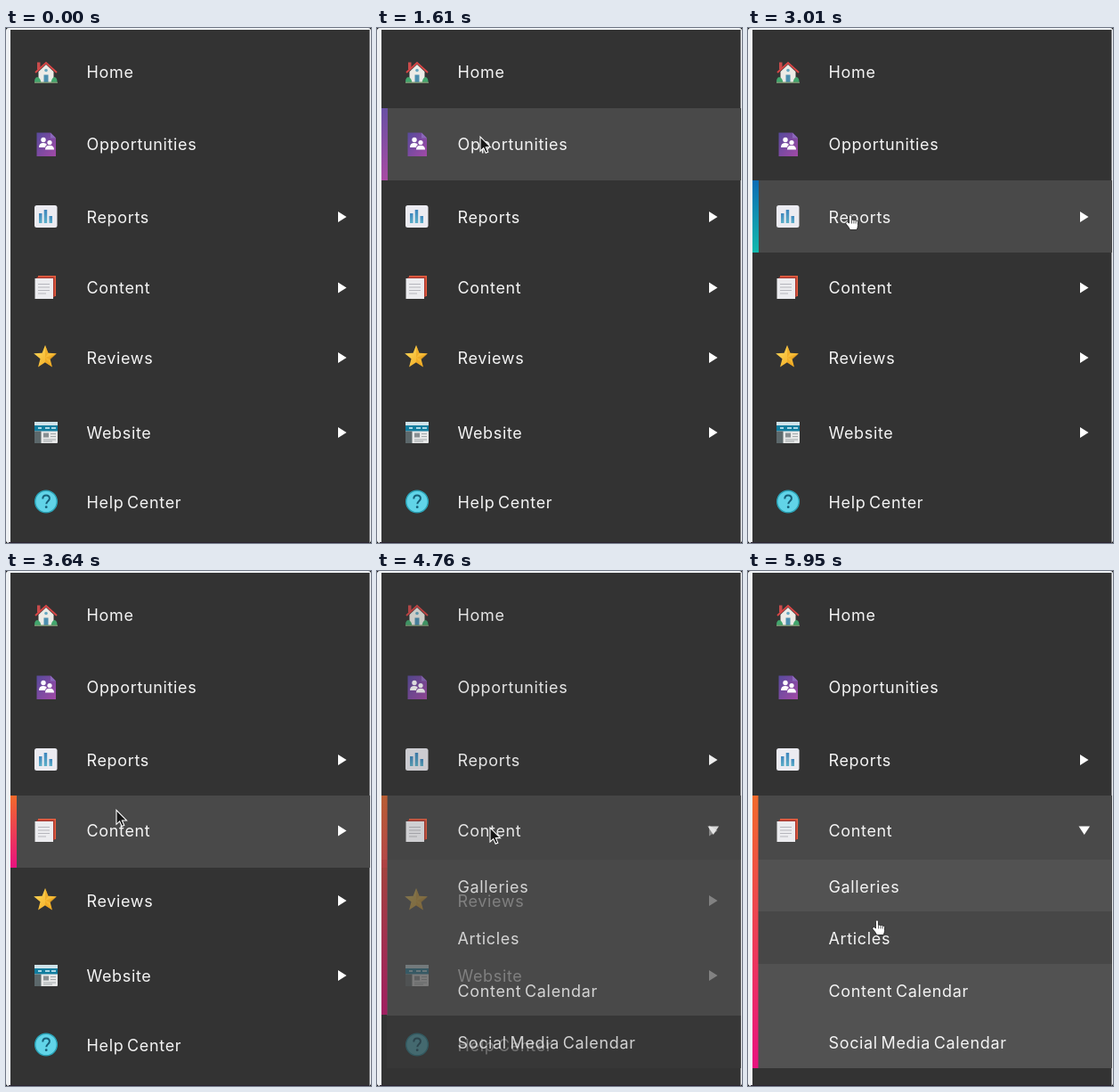
An HTML page that plays this animation: 410x578 px, repeating every 6.3 s.

```html
<!DOCTYPE html>
<html lang="en">
<head>
<meta charset="utf-8">
<title>Sidebar menu</title>
<style>
  html, body { margin: 0; width: 100%; height: 100%; overflow: hidden; background: #000; }
  svg { display: block; width: 410px; height: 578px; }
  text { font: 400 18px Inter, "Open Sans", sans-serif; letter-spacing: .65px; word-spacing: -2px; fill: #f4f4f4; }
  #hovers, #submenu { shape-rendering: crispEdges; }
</style>
</head>
<body>
<svg viewBox="0 0 410 578">
  <defs>
    <linearGradient id="purple" x2="0" y2="1"><stop stop-color="#6950a4"/><stop offset="1" stop-color="#a84ba3"/></linearGradient>
    <linearGradient id="teal" x2="0" y2="1"><stop stop-color="#0c6cb5"/><stop offset="1" stop-color="#12b9ad"/></linearGradient>
    <linearGradient id="sunset" x2="0" y2="1"><stop stop-color="#f26a2b"/><stop offset="1" stop-color="#e8127f"/></linearGradient>
    <linearGradient id="page" x2="1" y2="1"><stop stop-color="#574a9c"/><stop offset="1" stop-color="#a24aa6"/></linearGradient>
    <linearGradient id="column" x2="0" y2="1"><stop stop-color="#3f86bd"/><stop offset="1" stop-color="#5db0c9"/></linearGradient>
    <linearGradient id="gold" x2="1" y2="1"><stop stop-color="#ffdc5e"/><stop offset="1" stop-color="#f0a51c"/></linearGradient>
  </defs>

  <rect width="410" height="578" rx="3" fill="#eef1f4"/>
  <path d="M5 2H408.5V578H5z" fill="#333"/>
  <path d="M3 577H408v1H3z" fill="#2a2230"/>

  <g id="hovers"></g>
  <g id="submenu"></g>
  <g id="items"></g>
  <rect id="openBar" x="5" y="252" width="6.5" fill="url(#sunset)"/>

  <g id="icons">
    <g>
      <path d="M35 38.500h3.500v8H35z" fill="#c94b4b"/>
      <path d="M36.500 49 45 41 53.500 49V61h-17z" fill="#ecebe6"/>
      <path d="M33 50 45 39 57 50" fill="none" stroke="#d94747" stroke-width="1.900"/>
      <path d="M42.500 52.500h5v9h-5z" fill="#4b8fae"/>
      <circle cx="45" cy="47.500" r="1.800" fill="#67a8c2"/>
      <path d="M32 62q-.5-6 3-7 4 1 4.500 7zM50.500 62q.5-6 4-7 3.500 1 3 7z" fill="#42a66d"/>
      <path d="M32 60.500h26V62H32z" fill="#79906f"/>
    </g>
    <g>
      <path d="M34.500 117.500H50l6 6V144H34.500z" fill="url(#page)"/>
      <path d="M50 117.500v6h6z" fill="#8b68bb"/>
      <g fill="#fff">
        <circle cx="42" cy="125.500" r="2.700"/><path d="M37 134q0-5 5-5 3 0 4 2-2 1-2 3z"/>
        <circle cx="49" cy="128.500" r="2.600"/><path d="M44 136.500q0-4.800 5-4.800t5 4.800z"/>
      </g>
    </g>
    <g>
      <rect x="32" y="199" width="25.500" height="25" rx="2.500" fill="#ebebf1"/>
      <g fill="url(#column)">
        <rect x="37" y="208" width="3.500" height="11"/>
        <rect x="42.700" y="204" width="3.500" height="15"/>
        <rect x="48.500" y="211" width="3.500" height="8"/>
      </g>
    </g>
    <g>
      <path d="M36 278h20v23H36z" fill="#e85f3f"/>
      <path d="M34.500 279.500h20V302h-20z" fill="#a83932"/>
      <path d="M32.500 281h20.500v23H32.500z" fill="#ececef"/>
      <path d="M36 287.500h13M36 291h13M36 294.500h13M36 298h9" stroke="#b6b6bc" stroke-width="1.200"/>
    </g>
    <g class="covered">
      <path id="star" fill="url(#gold)"/>
      <path d="M44 370 44 356 47.500 364.700zM44 370 57 365.500 50 372zM44 370 52 380.500 44 375.500z" fill="#e9a01c" opacity=".55"/>
    </g>
    <g class="covered">
      <rect x="32" y="442" width="26" height="24" rx="1" fill="#e7e8e8"/>
      <path d="M32 442h26v4H32z" fill="#cfe3ea"/>
      <path d="M32 446h26v6.500H32z" fill="#117d9f"/>
      <path d="M36 449h4M44 449h5M51 449h5" stroke="#d9f4fb" stroke-width="1.500"/>
      <path d="M32 452.500h7.500V466H32z" fill="#5c686b"/>
      <path d="M42 454.500h6v5h-6z" fill="#888f92"/>
      <path d="M50 455.500h6M50 458.500h6M42 462h14M42 464h10" stroke="#a2a8aa"/>
    </g>
    <g class="covered">
      <circle cx="45" cy="531.500" r="12.300" fill="#61d4e8" stroke="#2ba3b7" stroke-width="1.500"/>
      <path d="M41.300 528.500q0-4 3.800-4t3.800 3.500c0 3-3.600 3-3.600 6.300" fill="none" stroke="#176079" stroke-width="2"/>
      <circle cx="45.200" cy="537.700" r="1.400" fill="#176079"/>
    </g>
  </g>

  <path id="downArrow" d="M371.500 286.500h12.500l-6.250 9.500z" fill="#fff"/>

  <g id="cursor">
    <path id="arrow" d="M0 0V16L3.700 12.600 6.200 18.200 8.800 17.100 6.400 11.600H11.500z" fill="#171717" stroke="#fff" stroke-width="1.100"/>
    <g id="hand" transform="translate(-5.500 -.5)">
      <path d="M4 9.500V1.800a1.400 1.400 0 0 1 2.900 0V6q1.500-.8 2.500.3 1.400-.7 2.300.5 1.900-.5 2.300 1V12q0 2.500-1.400 5H5.200Q3.500 13.500.4 10.300 0 8.200 2 8z" fill="#fff" stroke="#1a1a1a" stroke-width=".8"/>
      <path d="M7 6.500V10M9.400 6.800V10M11.700 7.300V10" stroke="#1a1a1a" stroke-width=".7"/>
    </g>
  </g>
</svg>

<script>
const LOOP = 6300, STEP = 70;
const byId = id => document.getElementById(id);

function add(parent, tag, attrs, text = "") {
  const node = document.createElementNS("http://www.w3.org/2000/svg", tag);
  for (const name in attrs) node.setAttribute(name, attrs[name]);
  node.textContent = text;
  return parent.appendChild(node);
}

const menu = [
  ["Home", 49], ["Opportunities", 130.5], ["Reports", 212, true], ["Content", 291.5, true],
  ["Reviews", 370, true], ["Website", 454, true], ["Help Center", 532]
];
const groups = menu.map(([label, y, hasArrow]) => {
  const group = add(byId("items"), "g", {});
  add(group, "text", { x: 90.5, y: y + 6.5 }, label);
  const arrow = hasArrow && add(group, "path", { d: `M373 ${y - 6}l9.500 6-9.500 6z`, fill: "#fff" });
  return { group, arrow };
});

const hovers = ["purple", "teal", "sunset"].map((color, i) => {
  const y = 90 + 81 * i;
  return {
    row: add(byId("hovers"), "rect", { x: 5, y, width: 404, height: 81, fill: "#494949" }),
    bar: add(byId("hovers"), "rect", { x: 5, y, width: 7, height: 81, fill: `url(#${color})` })
  };
});

const subRows = ["Galleries", "Articles", "Content Calendar", "Social Media Calendar"].map((label, i) => {
  const y = Math.floor(324 + 58.5 * i), height = Math.floor(324 + 58.5 * (i + 1)) - y;
  const box = { x: 11, y, width: 398, height };
  return {
    back: add(byId("submenu"), "rect", { ...box, fill: "#525252" }),
    hover: add(byId("submenu"), "rect", { ...box, fill: "#474747" }),
    text: add(byId("submenu"), "text", { x: 90.5, y: y + 36.5 }, label)
  };
});

byId("star").setAttribute("d", "M" + Array.from({ length: 10 }, (_, i) => {
  const radius = i % 2 ? 5.8 : 13.5, angle = i * Math.PI / 5;
  return `${44 + radius * Math.sin(angle)} ${369.5 - radius * Math.cos(angle)}`;
}).join("L") + "z");

const ramp = (t, from, to) => Math.min(1, Math.max(0, (t - from) / (to - from)));
const easeIn = p => p * p;
const easeOut = p => 1 - (1 - p) ** 2;
const easeOutCubic = p => 1 - (1 - p) ** 3;
const easeInOut = p => p * p * (3 - 2 * p);
const fade = (node, value) => node.setAttribute("opacity", value);

// start, end, destination x and y, easing
const moves = [
  [1575, 2240, 115, 170, easeIn],
  [2240, 2590, 115, 210, easeOut],
  [3395, 4060, 127, 288, easeOutCubic],
  [5285, 5950, 145, 392, easeInOut]
];
const handTimes = [[1260, 1610], [2520, 3430], [4130, 4410], [5880, LOOP]];

function drawCursor(t) {
  let x = 116, y = 122;
  for (const [from, to, endX, endY, ease] of moves) {
    const p = ease(ramp(t, from, to));
    x += (endX - x) * p;
    y += (endY - y) * p;
  }
  const isHand = handTimes.some(([from, to]) => t >= from && t < to);
  byId("cursor").setAttribute("transform", `translate(${x} ${y})`);
  fade(byId("cursor"), t >= 1190 ? 1 : 0);
  fade(byId("hand"), isHand ? 1 : 0);
  fade(byId("arrow"), isHand ? 0 : 1);
}

function draw(t) {
  const open = ramp(t, 4550, 4900);
  const dim = 1 - .7 * open * (1 - open);
  const covered = (1 - open) ** 1.25;
  const toReports = ramp(t, 2240, 2590), toContent = ramp(t, 3360, 3570);
  const levels = [ramp(t, 1190, 1470) * (1 - toReports), toReports * (1 - toContent), toContent];

  hovers.forEach(({ row, bar }, i) => {
    fade(row, levels[i] * (i === 2 ? dim : 1));
    fade(bar, levels[i] * (i === 2 ? (1 - open) ** 2 : 1));
  });
  hovers[2].row.setAttribute("height", open ? 72 : 81);
  groups.forEach(({ group }, i) => fade(group, i > 3 ? covered : (1 + dim) / 2));
  fade(groups[3].arrow, 1 - open);
  for (const icon of byId("icons").children) {
    fade(icon, icon.classList.contains("covered") ? covered : dim);
  }

  const toArticles = ramp(t, 5740, 5880);
  const subLevels = [ramp(t, 5530, 5670) * (1 - toArticles), toArticles, 0, 0];
  subRows.forEach(({ back, hover, text }, i) => {
    fade(back, open ** .6);
    fade(hover, subLevels[i]);
    fade(text, open ** .4);
  });
  subRows[3].back.setAttribute("fill", open < 1 ? "#3a3a3a" : "#525252");
  byId("openBar").setAttribute("height", open < 1 ? 246 : 306);
  fade(byId("openBar"), open);
  fade(byId("downArrow"), Math.sqrt(open));
  drawCursor(t);
}

const start = performance.now();
function tick() {
  const t = (performance.now() - start) % LOOP;
  draw(Math.floor(t / STEP) * STEP);
  requestAnimationFrame(tick);
}
tick();
</script>
</body>
</html>
```
